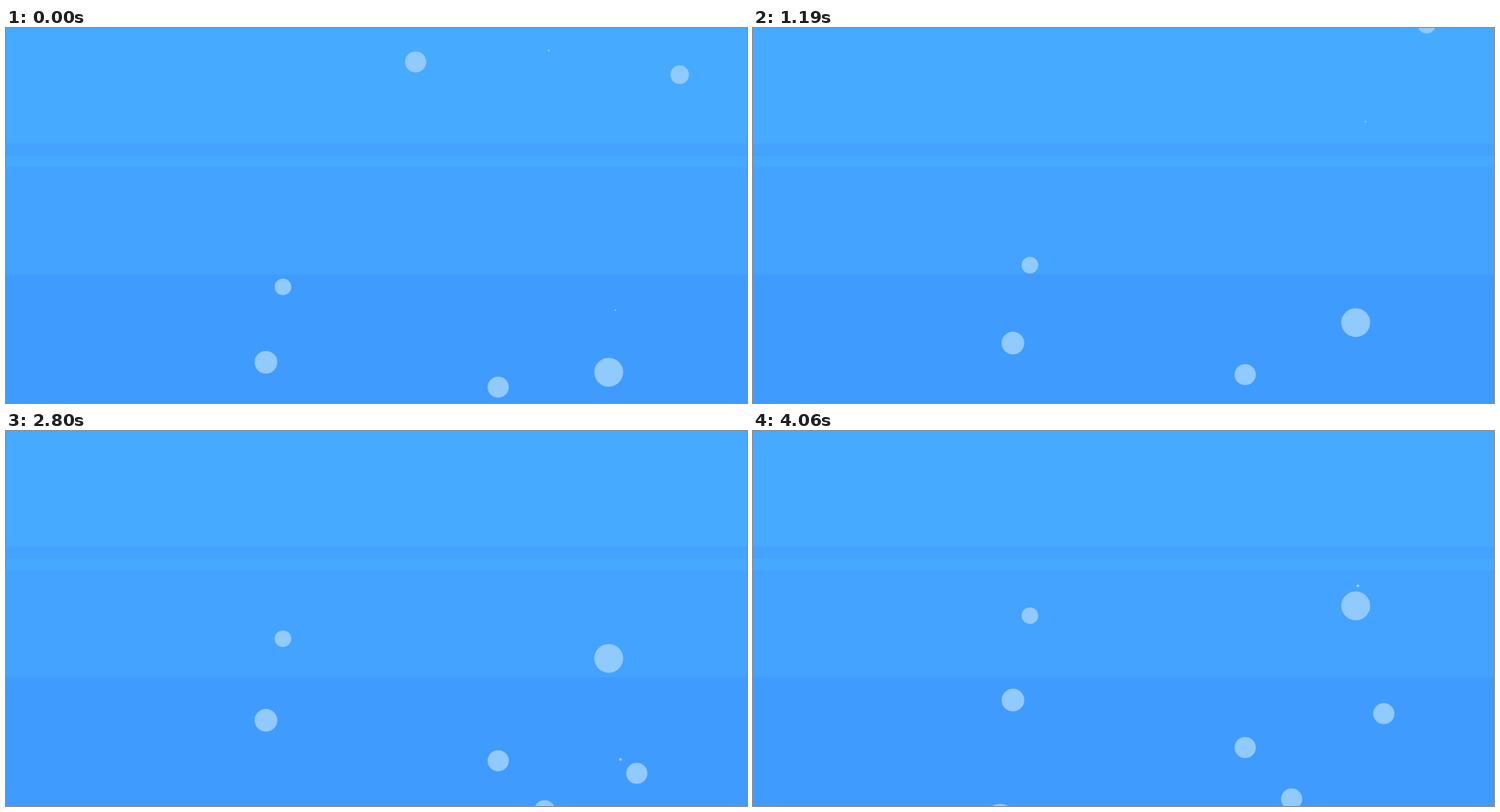
Write an HTML page with a canvas that moves like this. It is 1051x533 px and loops after 4.13 s.

```html
<!DOCTYPE html>
<html lang="en">
<head>
<meta charset="utf-8">
<title>Rising bubbles</title>
<style>
  html, body { margin: 0; width: 100%; height: 100%; overflow: hidden; background: #409bff; }
  canvas { display: block; width: 100%; height: 100%; }
</style>
</head>
<body>
<canvas id="stage" width="1051" height="533"></canvas>
<script>
const LOOP = 4130, STEP = 70;
const WIDTH = 1051, HEIGHT = 533;
const SPECK_ACCEL = 54; // px/s²
const ctx = document.getElementById('stage').getContext('2d');

function band(color, top, bottom) {
  ctx.fillStyle = color;
  ctx.fillRect(0, top, WIDTH, bottom - top);
}

function circle(x, y, r) {
  ctx.beginPath();
  ctx.arc(x, y, r, 0, Math.PI * 2);
  ctx.fill();
}

function drawWater() {
  band('#46abff', 0, 164);
  band('#43a3ff', 164, 350);
  band('#44a9ff', 181, 198);
  band('#409bff', 350, HEIGHT);
}

// Large bubbles rise straight up at a steady speed in px/s.
function drawBubbles(seconds) {
  const bubble = (x, startY, speed, r = 15) => circle(x, startY - speed * seconds, r);
  ctx.fillStyle = '#91caff';
  bubble(581, 48.2, 57.2);
  bubble(955.5, 66.3, 60.5, 13.2);
  bubble(392.8, 368, 26, 11.8);
  bubble(368.7, 475, 22.8, 16.1);
  bubble(698.1, 510.4, 14.9);
  bubble(854.9, 489.2, 59.3, 20.5);
  bubble(894.7, 675, 67.3);
  bubble(764, 577, 13.3);
  bubble(350.5, 592.5, 10, 22);
}

// Specks leave the bottom edge at a given time, speeding up and drifting sideways.
function drawSpecks(seconds) {
  const speck = (x, launch, speed, drift, r) => {
    const age = seconds - launch;
    if (age < 0) return;
    circle(x + drift * age, HEIGHT - speed * age - SPECK_ACCEL * age * age / 2, r);
  };
  ctx.fillStyle = '#a0d2ff';
  speck(769.7, -2.435, 140, 0, 1.2);
  speck(861.5, -0.766, 151.6, 3.6, 1.1);
  speck(876.2, 2.358, 138, -10.7, 2);
}

function tick() {
  const seconds = Math.floor(performance.now() % LOOP / STEP) * STEP / 1000;
  drawWater();
  drawBubbles(seconds);
  drawSpecks(seconds);
  requestAnimationFrame(tick);
}
tick();
</script>
</body>
</html>
```
